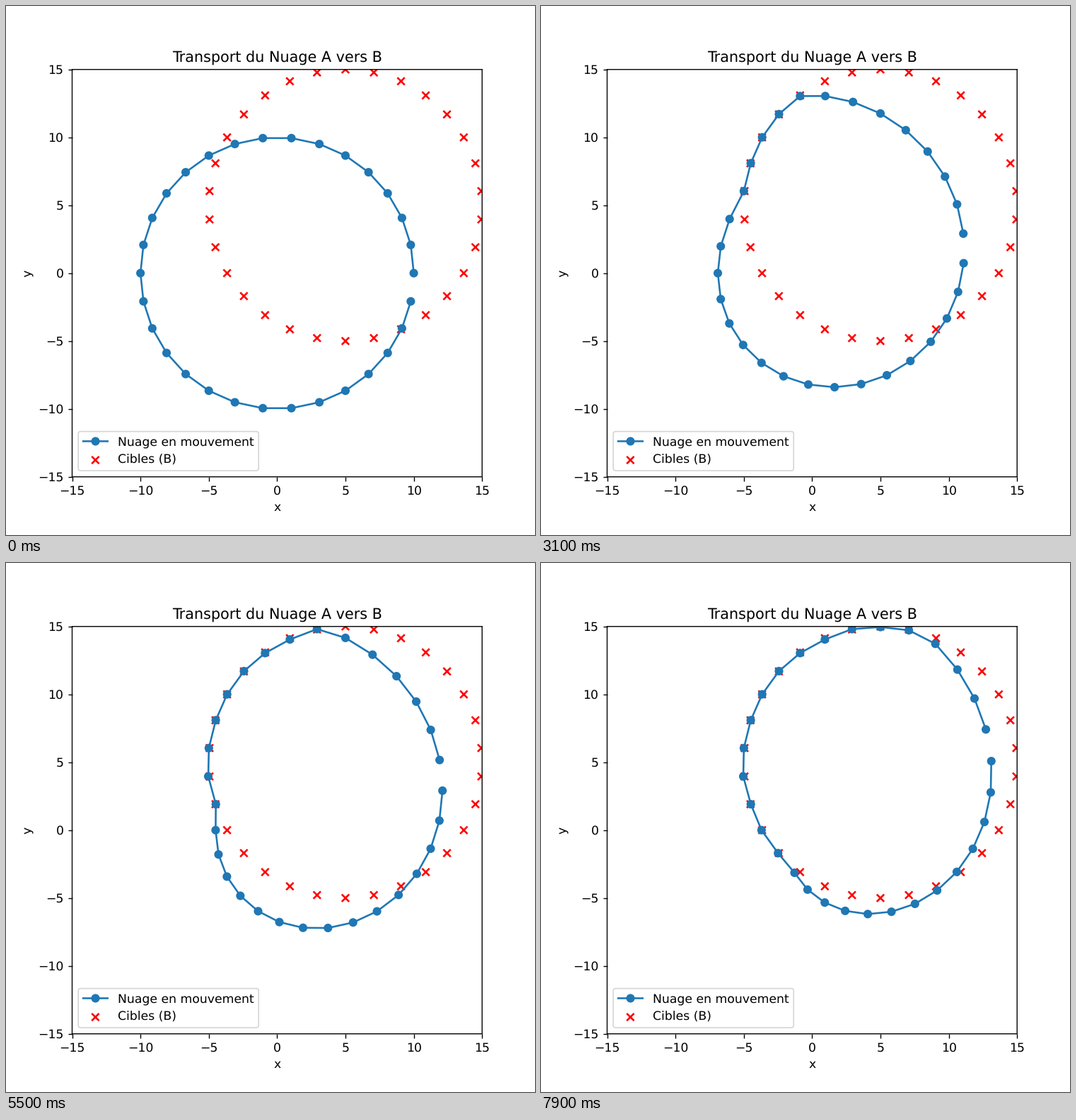
These frames come from a looping animation (748x748 px, 8000 ms). A matplotlib script:

```python
import numpy as np
import matplotlib.pyplot as plt
from matplotlib.animation import FuncAnimation

SIZE = 748
FRAMES = 80
INTERVAL = 100
COUNT = 30
RADIUS = 10
STEP = 0.1

# Smooth sub-pixel placement of lines and glyphs
plt.rcParams.update({"path.snap": False, "text.hinting": "none"})


def circle(center, phase):
    angles = phase + np.linspace(0, 2 * np.pi, COUNT, endpoint=False)
    ring = np.column_stack((np.cos(angles), np.sin(angles)))
    return np.array(center) + RADIUS * ring


start = circle((0, 0), 0)
goal = circle((5, 5), np.pi / 6)
gap = goal - start
dist = np.linalg.norm(gap, axis=1)
heading = gap / dist[:, None]
arrival = np.ceil(dist / STEP)


def positions(n):
    # Fixed-length steps: each point overshoots its goal, then hops back and forth
    hops = np.where(n < arrival, n, arrival - (n - arrival) % 2)
    return start + STEP * hops[:, None] * heading


def scatter(points, color, **style):
    # One colour per point keeps markers from being rounded to whole pixels
    return ax.scatter(*points.T, color=[color] * COUNT, **style)


fig, ax = plt.subplots(figsize=(6, 6), dpi=SIZE / 6)
ax.set_xlim(-15, 15)
ax.set_ylim(-15, 15)
path, = ax.plot(*start.T, "o-", color="tab:blue", label="Nuage en mouvement")
scatter(goal, "red", marker="x", label="Cibles (B)")
ax.set_title("Transport du Nuage A vers B")
ax.set_xlabel("x")
ax.set_ylabel("y")
ax.legend(loc="lower left")

# The legend keeps its own marker; the moving dots are drawn separately
path.set_marker("")
dots = scatter(start, "tab:blue", s=36, linewidths=1, zorder=2)


def update(n):
    points = positions(n)
    path.set_data(*points.T)
    dots.set_offsets(points)
    return path, dots


anim = FuncAnimation(fig, update, frames=FRAMES, interval=INTERVAL,
                     repeat=True, repeat_delay=0)
plt.show()
```
